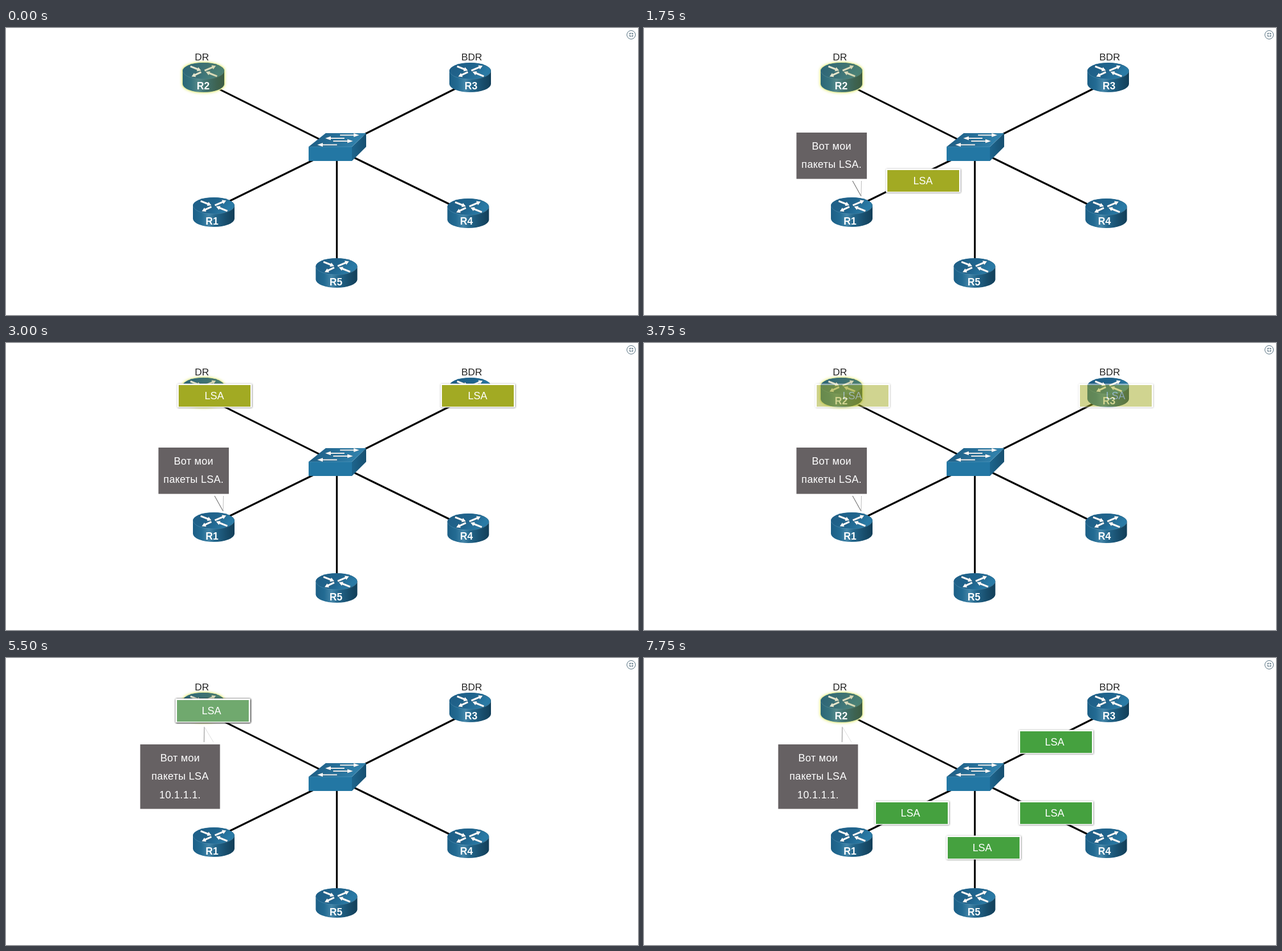
Animation, 1109 px wide and 505 px high, one loop 8 s. Source, as an HTML page with a canvas:

```html
<!DOCTYPE html>
<html lang="ru">
<head>
<meta charset="utf-8">
<title>LSA</title>
<style>
html, body { margin: 0; width: 100%; height: 100%; overflow: hidden; background: #fff; }
canvas { display: block; }
</style>
</head>
<body>
<canvas id="stage" width="1109" height="505"></canvas>
<script>
const W = 1109, H = 505, LOOP = 8000, STEP = 250;
const SANS = '"Liberation Sans", Arial, sans-serif';
const OLIVE = '#a2aa23', GREEN = '#45a13f', PALE = '#70a96e';
const HUB = [596, 210.5];
const ctx = document.getElementById('stage').getContext('2d');

function layer(w, h) {
  const c = document.createElement('canvas');
  c.width = w;
  c.height = h;
  return c;
}

function poly(g, pts, fill) {
  g.beginPath();
  pts.forEach(([x, y]) => g.lineTo(x, y));
  g.closePath();
  g.fillStyle = fill;
  g.fill();
}

function line(g, pts, color, width) {
  g.beginPath();
  pts.forEach(([x, y]) => g.lineTo(x, y));
  g.strokeStyle = color;
  g.lineWidth = width;
  g.stroke();
}

function text(g, str, x, y, size, color, weight = '') {
  g.font = `${weight} ${size}px ${SANS}`;
  g.textAlign = 'center';
  g.fillStyle = color;
  g.fillText(str, x, y);
}

function gradient(g, x0, y0, x1, y1, stops) {
  const grad = g.createLinearGradient(x0, y0, x1, y1);
  stops.forEach(([at, color]) => grad.addColorStop(at, color));
  return grad;
}

function arrow(g, [ax, ay], [bx, by], half, headLen, headHalf) {
  const d = Math.hypot(bx - ax, by - ay);
  const ux = (bx - ax) / d, uy = (by - ay) / d;
  const at = (along, side) => [ax + ux * along - uy * side, ay + uy * along + ux * side];
  const neck = d - headLen;
  poly(g, [at(0, -half), at(neck, -half), at(neck, -headHalf), at(d, 0),
    at(neck, headHalf), at(neck, half), at(0, half)], '#fff');
  g.strokeStyle = 'rgba(60,50,45,.3)';
  g.lineWidth = 0.5;
  g.stroke();
}

function drumPath(g, x, y) {
  g.beginPath();
  g.ellipse(x, y + 14.5, 36.5, 14.5, 0, Math.PI, 0);
  g.lineTo(x + 36.5, y + 37.5);
  g.ellipse(x, y + 37.5, 36.5, 14.5, 0, 0, Math.PI);
  g.closePath();
}

function router(g, x, y, name, tx, ty, lit) {
  g.save();
  if (lit) {
    g.shadowColor = 'rgba(222,230,100,.8)';
    g.shadowBlur = 4;
    drumPath(g, x, y);
    g.strokeStyle = '#e9efa6';
    g.lineWidth = 3;
    g.stroke();
    g.shadowColor = 'transparent';
  }
  drumPath(g, x, y);
  g.fillStyle = gradient(g, x - 36, 0, x + 36, 0,
    [[0, '#1c5f86'], [0.2, '#236b93'], [0.38, '#4485a8'], [0.55, '#23658a'], [0.8, '#184e6d'], [1, '#123f59']]);
  g.fill();
  g.beginPath();
  g.ellipse(x, y + 14.5, 36.3, 14.3, 0, 0, 7);
  g.fillStyle = gradient(g, x - 20, y, x + 16, y + 30,
    [[0, '#1f6088'], [0.5, '#20648d'], [1, '#2a7aa5']]);
  g.fill();
  g.beginPath();
  g.ellipse(x, y + 14.8, 36, 14.5, 0, 0.1, Math.PI - 0.1);
  g.strokeStyle = 'rgba(110,165,195,.45)';
  g.lineWidth = 0.8;
  g.stroke();
  const mark = (x0, y0, x1, y1) => arrow(g, [x + x0, y + y0], [x + x1, y + y1], 1.7, 7, 4);
  mark(-23, 6.5, -4, 14);
  mark(2, 14, 22, 5.5);
  mark(-4, 16.5, -21, 24.5);
  mark(24, 24, 4, 16);
  if (lit) {
    drumPath(g, x, y);
    g.fillStyle = gradient(g, x - 36, 0, x + 36, 0,
      [[0, 'rgba(120,140,40,.16)'], [0.5, 'rgba(140,150,50,.28)'], [1, 'rgba(125,135,30,.4)']]);
    g.fill();
  }
  text(g, name, tx, ty, 17.5, '#fff', 'bold');
  g.restore();
}

function hubBox(g) {
  poly(g, [[531, 209], [561, 185], [632, 185], [607, 209]],
    gradient(g, 545, 185, 610, 212, [[0, '#1f6087'], [1, '#3080ab']]));
  poly(g, [[531, 209], [607, 209], [607, 234], [531, 234]], '#2377a4');
  poly(g, [[607, 209], [632, 185], [632, 209], [607, 234]],
    gradient(g, 607, 0, 632, 0, [[0, '#1d658d'], [1, '#174f70']]));
  line(g, [[531, 209], [607, 209], [632, 185]], 'rgba(110,170,200,.5)', 0.8);
  [[586, 188.5, 620], [594, 194, 560], [574, 199, 609], [581, 205.5, 546]].forEach(
    ([x0, y, x1]) => arrow(g, [x0, y], [x1, y], 0.9, 10, 3.4));
}

function shrinkIcon(g) {
  g.beginPath();
  g.arc(1097, 12, 7.5, 0, 7);
  g.strokeStyle = '#557080';
  g.lineWidth = 1;
  g.stroke();
  for (const sx of [-1, 1]) for (const sy of [-1, 1]) {
    const p = (x, y) => [1097 + sx * x, 12 + sy * y];
    line(g, [p(3.7, 1.5), p(1.5, 1.5), p(1.5, 3.7)], '#3a5a6c', 1.1);
  }
}

function makeScene() {
  const c = layer(W, H), g = c.getContext('2d');
  g.fillStyle = '#fff';
  g.fillRect(0, 0, W, H);
  [[360, 100.6, 560, 200.6], [800, 101, 620, 191.5], [380, 310.5, 550, 227],
    [790, 315.8, 600, 222.8], [580.5, 225, 580.5, 415]].forEach(
    ([x0, y0, x1, y1]) => line(g, [[x0, y0], [x1, y1]], '#000', 3.2));
  hubBox(g);
  router(g, 346.5, 61, 'R2', 346, 108, true);
  router(g, 814.5, 61, 'R3', 816, 107.5);
  router(g, 364.5, 298, 'R1', 361.5, 346);
  router(g, 811, 300, 'R4', 808, 346);
  router(g, 580, 405, 'R5', 579, 453);
  text(g, 'DR', 343.7, 57, 17.3, '#222');
  text(g, 'BDR', 817.2, 57, 17.3, '#222');
  shrinkIcon(g);
  return c;
}

function makeCard(color, tx) {
  const c = layer(150, 60), g = c.getContext('2d');
  g.shadowColor = 'rgba(0,0,0,.75)';
  g.shadowBlur = 3;
  g.shadowOffsetY = 0.8;
  g.fillStyle = '#fff';
  g.fillRect(9.5, 8.5, 131, 42);
  g.shadowColor = 'transparent';
  g.fillStyle = color;
  g.fillRect(12, 11, 126, 38);
  text(g, 'LSA', 75 + tx, 36, 18, '#fff');
  return c;
}

const scene = makeScene();
const cards = { [OLIVE]: makeCard(OLIVE, -0.5), [GREEN]: makeCard(GREEN, -2.5), [PALE]: makeCard(PALE, -2.5) };

function card(color, [x, y]) {
  ctx.drawImage(cards[color], Math.round(x - 75), Math.round(y - 30));
}

function bubble(x, y, w, h, lines, tail, edges) {
  ctx.fillStyle = '#666163';
  ctx.fillRect(x, y, w, h);
  ctx.letterSpacing = '0.3px';
  lines.forEach((s, i) => text(ctx, s, x + w / 2, y + 29.5 + i * 32.7, 18, '#fff'));
  ctx.letterSpacing = '0px';
  poly(ctx, tail, '#fff');
  line(ctx, tail.slice(0, 2), edges[0], 1.2);
  line(ctx, tail.slice(1), edges[1], 1);
}

const mix = (a, b, p) => a.map((v, i) => v + (b[i] - v) * p);

// Piecewise progress through [time, value] pairs
function track(t, keys) {
  let [t0, v0] = keys[0];
  if (t <= t0) return v0;
  for (const [t1, v1] of keys) {
    if (t < t1) return v0 + (v1 - v0) * (t - t0) / (t1 - t0);
    [t0, v0] = [t1, v1];
  }
  return v0;
}

const fromHub = (dx, dy, p) => [HUB[0] + dx * p, HUB[1] + dy * p];

function firstFlood(t) {
  if (t <= 2000) {
    const p = track(t, [[1431, 0], [2031, 1]]);
    card(OLIVE, mix([369, 336], HUB, p));
    return;
  }
  const p = track(t, [[2000, 0], [2250, 0.285], [2500, 0.585], [2750, 0.945], [2800, 1]]);
  ctx.globalAlpha = track(t, [[3250, 1], [4250, 0]]);
  card(OLIVE, fromHub(-230.5, -117.5, p));
  card(OLIVE, fromHub(232, -117.5, p));
  ctx.globalAlpha = 1;
}

// Four stacked cards travel as one, then part at the hub
function secondFlood(t) {
  const p = track(t, [[6200, 0], [6250, 0.05], [6500, 0.325], [6750, 0.66], [7000, 0.985]]);
  const q = track(t, [[7250, 0], [7750, 1]]);
  const start = mix([363, 92.5], HUB, p);
  const color = t < 5750 ? PALE : GREEN;
  [[126.5, -62.5], [126.5, 62.5], [-126, 62.5], [0, 123]].forEach(
    ([dx, dy]) => card(color, q ? fromHub(dx, dy, q) : start));
}

function draw(t) {
  ctx.drawImage(scene, 0, 0);
  if (t >= 1250 && t < 5500) {
    bubble(267.5, 184, 123.5, 81.5, ['Вот мои', 'пакеты LSA.'],
      [[366, 269], [381, 296], [381.5, 269]], ['#777', '#bbb']);
  }
  if (t >= 5500) {
    bubble(235.5, 152, 140, 113.5, ['Вот мои', 'пакеты LSA', '10.1.1.1.'],
      [[347.5, 148], [348, 121], [364, 148]], ['#999', '#ddd']);
  }
  if (t >= 1250 && t < 4250) firstFlood(t);
  if (t >= 5500) secondFlood(t);
}

const begin = performance.now();
function tick() {
  const t = (performance.now() - begin) % LOOP;
  draw(Math.floor(t / STEP) * STEP);
  requestAnimationFrame(tick);
}
tick();
</script>
</body>
</html>
```
